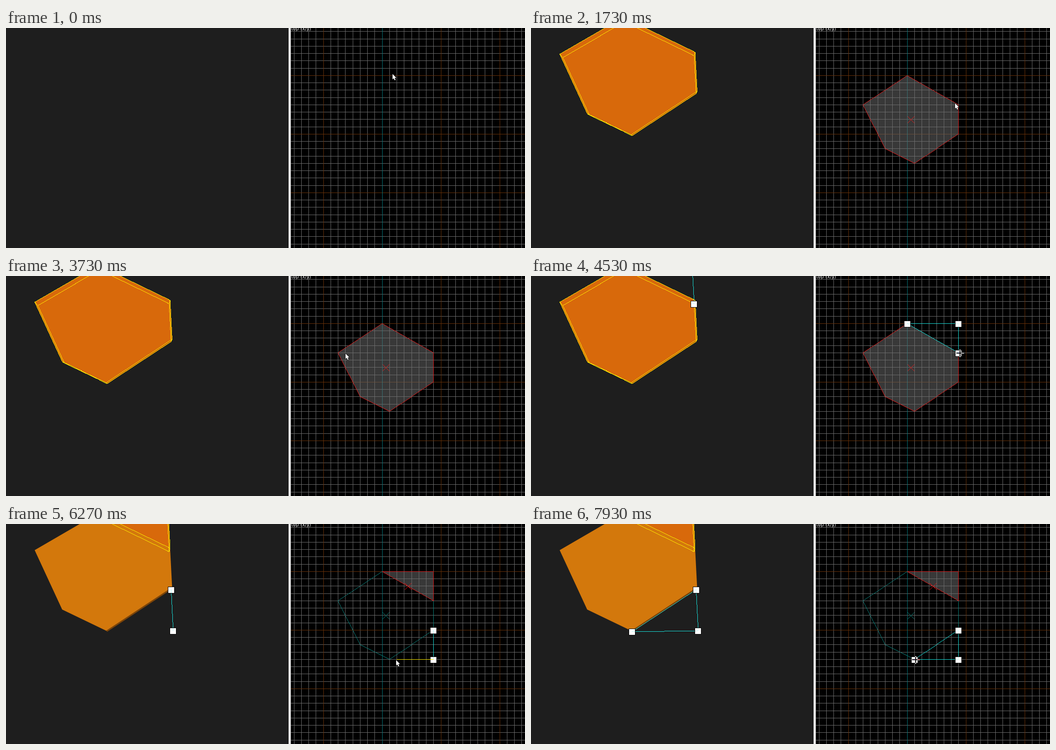
These frames come from a looping animation (1148 px wide and 488 px high, 8000 ms). An HTML page with a canvas:

```html
<!DOCTYPE html>
<html lang="en">
<head>
<meta charset="utf-8">
<title>Brush drawing</title>
<style>
  html, body { margin: 0; width: 100%; height: 100%; overflow: hidden; background: #1e1e1e; }
  canvas { display: block; width: 1148px; height: 488px; }
  .label { position: absolute; left: 631px; top: -5px; color: #e4e4e4;
           font: 10.3px/12px "DejaVu Sans", Verdana, sans-serif; white-space: pre; }
</style>
</head>
<body>
<canvas id="stage" width="1148" height="488"></canvas>
<div class="label">top (x/y)</div>
<script>
const ctx = document.getElementById('stage').getContext('2d');
const LOOP = 8000, STEP = 1000 / 15;
const CELL = 16.25, OX = 832, OY = 105.25, SPLIT = 630;
const CYAN = '#18e4de', TEAL = '#0b827c', RED = '#e41c1c', YELLOW = '#ffec00';

// Corners in grid cells
const A = [0, 0], B = [-6, 4], C = [-3, 10], D = [1, 12];
const E = [7, 8], F = [7, 4], G = [7, 0], H = [7, 12];
const HEX = [A, B, C, D, E, F], TRI = [A, G, F];

const plan = ([u, v]) => [OX + u * CELL, OY + v * CELL];

// Perspective of the ground plane, and of the same point raised to brush height
function floor([u, v]) {
  const w = 1.041 - .01025 * v;
  return [(215.2 + 22.35 * u - 2.667 * v) / w, (-14.3 - .31 * u + 19.5 * v) / w];
}
function ceil(c) {
  const [x, y] = floor(c), rise = .031;
  return [x + (x - 296.5) * rise, y + (y - 312) * rise];
}

// Each sketch is a run of clicks [step, corner] that ends when its brush is made.
const SKETCHES = [
  { end: 26, clicks: [[4, A], [9, B], [14, C], [16, D], [20, E], [23, F]] },
  { end: 71, clicks: [[60, A], [63, G], [68, F]] },
  { end: 120, clicks: [[78, E], [91, H], [109, D]] }
];

// Pointer wanderings between clicks: [step, x, y, rest until]
const WANDER = [
  [0, 855, 102], [13, 768, 254], [17, 870, 290], [24, 938, 167, 28], [35, 524, 150],
  [41, 766, 268], [45, 871, 115], [50, 930, 150], [56, 751, 172], [64, 959, 125],
  [65, 940, 168, 67], [70, 949, 171], [83, 940, 297], [86, 896, 290], [89, 949, 301],
  [94, 863, 302], [99, 857, 300, 102], [104, 855, 300, 108], [120, 851, 301]
];
const clickKeys = SKETCHES.flatMap(s => s.clicks).map(([n, c]) => {
  const [x, y] = plan(c);
  return [n, x + 3, y + 1];
});
const PATH = [...WANDER, ...clickKeys].sort((a, b) => a[0] - b[0]);

function pointerAt(n) {
  const i = Math.max(1, PATH.findIndex(p => p[0] >= n));
  const [from, x0, y0, rest = from] = PATH[i - 1], [to, x1, y1] = PATH[i];
  const k = Math.max(0, (n - rest) / (to - rest));
  return [Math.round(x0 + (x1 - x0) * k), Math.round(y0 + (y1 - y0) * k)];
}

function rect(x, y, w, h, color) {
  ctx.fillStyle = color;
  ctx.fillRect(x, y, w, h);
}

// Hard-edged line, one pixel wide
function line([x0, y0], [x1, y1], color) {
  const count = Math.ceil(Math.max(Math.abs(x1 - x0), Math.abs(y1 - y0), 1));
  ctx.fillStyle = color;
  for (let i = 0; i <= count; i++) {
    const k = i / count;
    ctx.fillRect(Math.floor(x0 + (x1 - x0) * k), Math.floor(y0 + (y1 - y0) * k), 1, 1);
  }
}
function outline(points, color) {
  points.forEach((p, i) => line(p, points[(i + 1) % points.length], color));
}
function fill(points, color) {
  ctx.beginPath();
  points.forEach(([x, y]) => ctx.lineTo(x, y));
  ctx.fillStyle = color;
  ctx.fill();
}

function clipTo(boxes, paint) {
  ctx.save();
  ctx.beginPath();
  boxes.forEach(b => ctx.rect(...b));
  ctx.clip();
  paint();
  ctx.restore();
}

function grid() {
  rect(SPLIT, 0, 518, 488, '#000');
  const column = (i, color) => rect(Math.floor(OX + i * CELL), 0, 1, 488, color);
  const row = (i, color) => rect(SPLIT, Math.floor(OY + i * CELL), 518, 1, color);
  for (let i = -6; i <= 23; i++) if (i % 8) row(i, '#6c6c6c');
  for (let i = -12; i <= 19; i++) if (i % 8) column(i, '#6c6c6c');
  for (let i = 0; i <= 16; i += 8) row(i, '#6a3208');
  for (let i = -8; i <= 16; i += 8) column(i, i ? '#6a3208' : '#04777a');
}

function planBrush(corners, selected) {
  const points = corners.map(plan), color = selected ? RED : TEAL;
  if (selected) fill(points, 'rgba(112,112,112,.5)');
  outline(points, color);
  const [cx, cy] = [0, 1].map(axis => {
    const values = points.map(p => p[axis]);
    return Math.round((Math.min(...values) + Math.max(...values)) / 2);
  });
  line([cx - 7, cy - 7], [cx + 7, cy + 7], color);
  line([cx - 7, cy + 7], [cx + 7, cy - 7], color);
}

function solidBrush(corners, selected) {
  if (corners === HEX)
    fill([ceil(E), floor(E), floor(D), ceil(D)], selected ? '#c9620a' : '#7c4408');
  fill(corners.map(ceil), selected ? '#d8690b' : '#d3780c');
}
function wireBrush(corners) {
  outline(corners.map(ceil), YELLOW);
  outline(corners.map(floor), YELLOW);
  corners.forEach(c => line(ceil(c), floor(c), YELLOW));
}

function handles(points) {
  const boxes = points.map(([x, y]) => [Math.floor(x) - 6, Math.floor(y) - 5, 13, 13]);
  for (const [x, y, w, h] of boxes) {
    rect(x - 1, y - 1, w + 2, h + 2, '#000');
    rect(x, y, w, h, '#fff');
  }
  clipTo(boxes, () => {
    ctx.globalAlpha = .2;
    outline(points, CYAN);
  });
}

function rubberBand(from, [x, y]) {
  const cell = [Math.round((x - OX) / CELL), Math.round((y - OY) / CELL)];
  line(plan(from), plan(cell), YELLOW);
}

function arrow(x, y) {
  ctx.save();
  ctx.translate(x, y);
  const shape = [[0, 0], [0, 12], [2.7, 9.6], [4.7, 14], [6.8, 13], [4.8, 8.8], [8.4, 8.5]];
  fill(shape, '#fff');
  ctx.closePath();
  ctx.globalCompositeOperation = 'destination-over';
  ctx.globalCompositeOperation = 'source-over';
  ctx.lineWidth = 1.6;
  ctx.lineJoin = 'round';
  ctx.strokeStyle = '#000';
  ctx.stroke();
  fill(shape, '#fff');
  ctx.restore();
}

function crosshair(x, y) {
  ctx.globalCompositeOperation = 'difference';
  rect(x - 8, y - 1, 17, 2, '#fff');
  rect(x - 1, y - 8, 2, 7, '#fff');
  rect(x - 1, y + 1, 2, 8, '#fff');
  ctx.globalCompositeOperation = 'source-over';
}

function draw(n) {
  const current = SKETCHES.findIndex(s => n < s.end);
  const placed = SKETCHES[current].clicks.filter(c => n >= c[0]).map(c => c[1]);
  const brushes = [HEX, TRI].slice(0, current);
  const isSelected = i => i === current - 1;
  const pointer = pointerAt(n);

  rect(0, 0, 1148, 488, '#1e1e1e');
  clipTo([[0, 0, 625, 488]], () => {
    const points = placed.map(floor);
    brushes.forEach((b, i) => solidBrush(b, isSelected(i)));
    outline(points, CYAN);
    brushes.filter((b, i) => isSelected(i)).forEach(wireBrush);
    handles(points);
  });
  rect(625, 0, 5, 488, '#e9e9e9');
  clipTo([[SPLIT, 0, 518, 488]], () => {
    const points = placed.map(plan);
    grid();
    brushes.forEach((b, i) => planBrush(b, isSelected(i)));
    outline(points, CYAN);
    handles(points);
    if (placed.length) rubberBand(placed[placed.length - 1], pointer);
  });
  const over = placed.map(plan).some(p => p.every((v, i) => Math.abs(pointer[i] - v) < 8));
  (over ? crosshair : arrow)(...pointer);
}

const start = performance.now();
function tick() {
  const t = (performance.now() - start) % LOOP;
  draw(Math.min(119, Math.floor((t + 4) / STEP)));
  requestAnimationFrame(tick);
}
tick();
</script>
</body>
</html>
```
